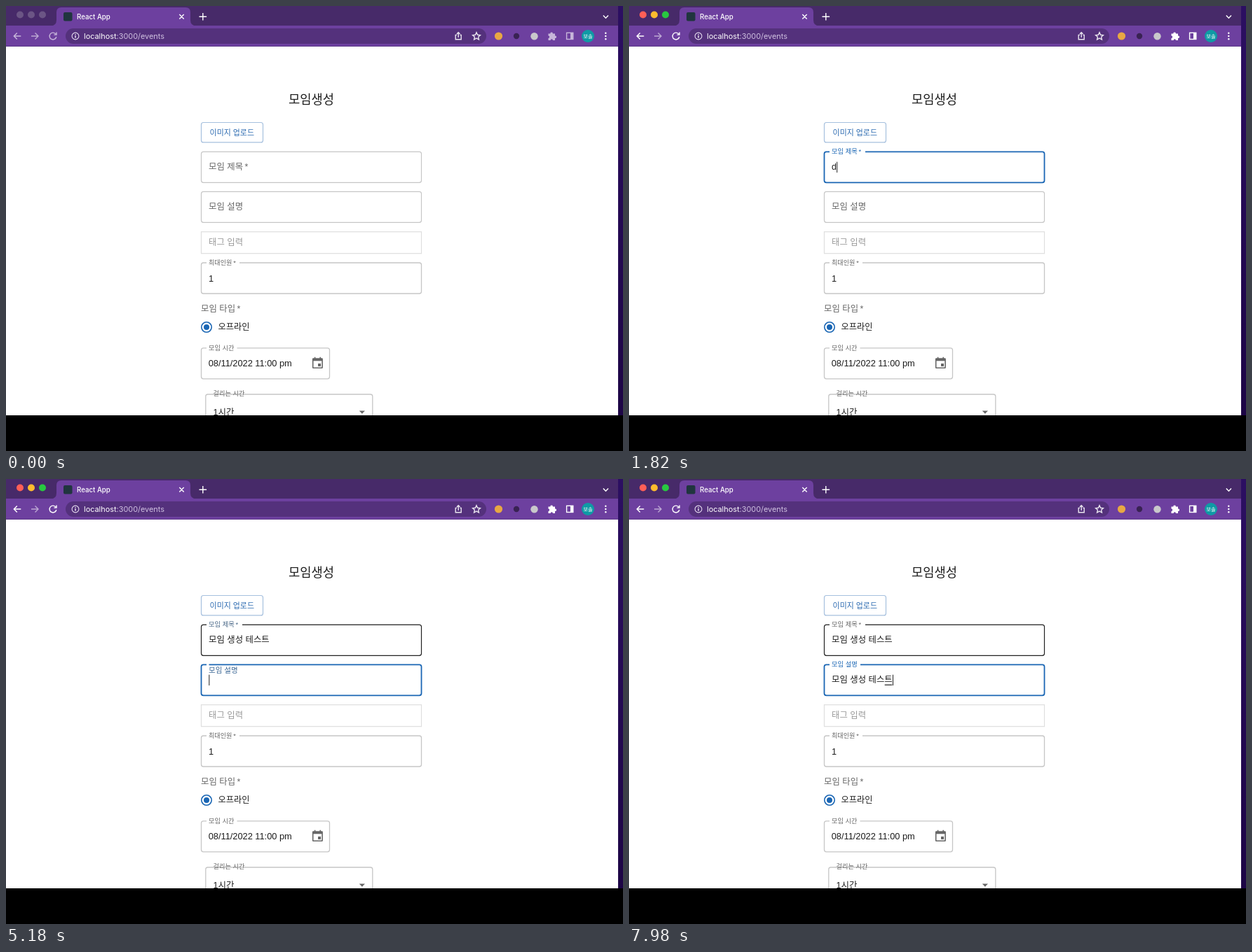
These frames come from a looping animation (880 px wide and 636 px high, 8000 ms). An HTML page:

```html
<!DOCTYPE html>
<html lang="ko">
<head>
<meta charset="utf-8">
<title>React App</title>
<style>
html, body { margin: 0; width: 100%; height: 100%; overflow: hidden; background: #000; }
svg { display: block; width: 100vw; height: 100vh; }
text { white-space: pre; font-family: 'Liberation Sans', 'Noto Sans CJK KR', 'Noto Sans CJK', sans-serif; }
.ui { font-family: Inter, 'Noto Sans CJK KR', 'Noto Sans CJK', sans-serif; }
</style>
</head>
<body>
<svg id="stage" viewBox="0 0 880 636" xmlns="http://www.w3.org/2000/svg"></svg>
<script>
const LOOP = 8000, TICK = 70;
const BLUE = '#1a66b4', GREY = '#c6c6c6', DARK = '#222', MUTED = '#666';
const ACTIVATE = 980, FOCUS_TITLE = 1072, TYPO = 1790, ERASE = 2870, FOCUS_DESC = 5128;

const text = (x, y, size, fill, str, extra = '') =>
  `<text x="${x}" y="${y}" font-size="${size}" fill="${fill}" ${extra}>${str}</text>`;
const box = (x, y, w, h, extra) => `<rect x="${x}" y="${y}" width="${w}" height="${h}" ${extra}/>`;
const dot = (x, y, r, extra) => `<circle cx="${x}" cy="${y}" r="${r}" ${extra}/>`;
const line = (d, extra = '') =>
  `<path d="${d}" fill="none" stroke="#fff" stroke-width="1.4" ${extra}/>`;
const outline = (x, y, w, h, id = '') =>
  box(x, y, w, h, `rx="3" fill="none" stroke="${GREY}" stroke-width="1.3" ${id}`);
const notch = (x, y, w, id = '') => box(x, y - 2, w, 4, `fill="#fff" ${id}`);

const chrome = `
  ${box(0, 0, 873, 58, 'fill="#472a69"')}
  <path d="M64 28.5Q72 28 72 20V9Q72 2 79 2H256Q263 2 263 9V20Q263 28 271 28.5Z" fill="#6d409f"/>
  ${box(0, 28, 873, 29.6, 'fill="#6d409f"')}
  ${['#ff5f57', '#febc2e', '#28c840'].map((c, i) =>
    dot(20 + 16 * i, 12.5, 5, `class="light" data-on="${c}"`)).join('')}
  ${box(82, 9, 12.5, 12.5, 'rx="2" fill="#20353f"')}
  ${text(101, 18.6, 9.7, '#fff', 'React App', 'class="ui" font-weight="500"')}
  ${line('M247.3 12l6.4 6.4M253.7 12l-6.4 6.4M275.5 15.2h10.6M280.8 9.9v10.6M851.8 13.6l3.6 3.6 3.6-3.6')}
  ${box(85, 32, 600, 22, 'rx="11" fill="#54317c"')}
  <g class="dim">
    ${line('M21.3 43H11.5M15.8 38.5L11.3 43l4.5 4.5')}
    ${line('M71 40.2a4.9 4.9 0 1 0 .8 3.8M72 37.6v3.5h-3.6')}
  </g>
  ${line('M36 43h9.8M41.5 38.5L46 43l-4.5 4.5', 'opacity=".55"')}
  ${dot(99, 43, 4.9, 'fill="none" stroke="#e6dcf0" stroke-width="1.1"')}
  ${line('M99 42.4v3.2M99 40.2v1.2', 'stroke-width="1.1"')}
  <text x="111" y="46.8" font-size="10.9" fill="#fff" class="ui">localhost<tspan fill="#cfc0e0">:3000/events</tspan></text>
  <g opacity=".88">
    ${line('M643 41.4h-1.8v6.4h8v-6.4h-1.8M645.2 45v-7M642.9 40l2.3-2.3 2.3 2.3', 'stroke-width="1.1"')}
    ${line('M671 37.8l1.6 3.5 3.8.4-2.8 2.6.8 3.7-3.4-1.9-3.4 1.9.8-3.7-2.8-2.6 3.8-.4Z', 'stroke-width="1.1"')}
  </g>
  ${dot(702.5, 43, 5.6, 'fill="#e8a843"')}
  ${dot(728, 43, 4.2, 'fill="#392253"')}
  ${dot(753.5, 43.2, 5.2, 'fill="#c9c8cb"')}
  <g class="dim">
    <path d="M773.5 39.5h3a1.7 1.7 0 1 1 3.3 0h3.2v3.2a1.7 1.7 0 1 1 0 3.3v3h-3a1.7 1.7 0 0 0-3.4 0h-3.1v-3.1a1.7 1.7 0 0 0 0-3.4Z" fill="#fff"/>
    ${box(799.6, 38.3, 9.2, 9.2, 'fill="none" stroke="#fff" stroke-width="1.4"')}
    ${box(805, 38.3, 4, 9.2, 'fill="#fff"')}
  </g>
  ${dot(830, 43, 9, 'fill="#0f9aa5"')}
  ${text(830, 45.7, 7.2, '#fff', '보솔', 'text-anchor="middle" class="ui"')}
  ${[38.8, 43, 47.2].map(y => dot(855.3, y, 1.2, 'fill="#fff"')).join('')}`;

// A text field whose label, outline and value change over time.
const liveField = (id, y, label) => `
  ${outline(278.5, y, 314, 44, `id="${id}Box"`)}
  ${notch(286, y, 0, `id="${id}Notch"`)}
  ${text(0, 0, 12.4, MUTED, label, `id="${id}Label"`)}
  ${text(289, y + 26, 12.4, '#1c1c1c', '', `id="${id}Text"`)}
  ${box(0, y + 28.4, 10.6, 1.2, `fill="#222" id="${id}Under"`)}
  ${box(0, y + 14.4, 1, 15.4, `fill="#222" id="${id}Caret"`)}`;

const form = `
  ${text(435.5, 139.8, 17.7, '#1c1c1c', '모임생성', 'text-anchor="middle"')}
  ${box(278.5, 166.5, 88, 28.4, 'rx="3" fill="none" stroke="#a6c0de" stroke-width="1.2"')}
  ${text(322.3, 184.6, 10.95, '#2a69b0', '이미지 업로드', 'text-anchor="middle" font-weight="500"')}
  ${liveField('title', 208.3, '모임 제목\u2009*')}
  ${liveField('desc', 265.3, '모임 설명')}
  ${box(278.5, 322.7, 314, 31, 'fill="none" stroke="#dedede" stroke-width="1.2"')}
  ${text(289, 341.9, 12.4, '#9a9a9a', '태그 입력')}
  ${outline(278.5, 367, 314, 44)}${notch(286, 367, 47)}
  ${text(289, 370, 9.1, MUTED, '최대인원\u2009*')}
  ${text(289, 393.8, 12.8, '#1c1c1c', '1')}
  ${text(278, 437.4, 12.4, MUTED, '모임 타입\u2009*')}
  ${dot(286, 459, 7.2, `fill="none" stroke="${BLUE}" stroke-width="1.6"`)}
  ${dot(286, 459, 4, `fill="${BLUE}"`)}
  ${text(302.6, 463.4, 12.2, '#1c1c1c', '오프라인')}
  ${outline(278.5, 488.8, 183, 44)}${notch(286, 488.8, 43.5)}
  ${text(289, 491.8, 9.2, MUTED, '모임 시간')}
  ${text(288.7, 515.2, 12.8, '#1c1c1c', '08/11/2022 11:00 pm')}
  <path fill="#666" fill-rule="evenodd" d="M439.8 501.8h1.6v1.5h6v-1.5h1.6v1.5h1.5q1.4 0 1.4 1.4v12q0 1.4-1.4 1.4h-12.2q-1.4 0-1.4-1.4v-12q0-1.4 1.4-1.4h1.5ZM438.5 507.2v9.3h11.8v-9.3ZM445 511h4v4h-4Z"/>
  ${outline(284.8, 555, 238, 44)}
  ${text(295.6, 557.2, 9.2, MUTED, '걸리는 시간')}
  ${text(295.6, 584.6, 12.5, '#1c1c1c', '1시간')}
  <path d="M503.8 578.6h8.2l-4.1 4.1Z" fill="#666"/>`;

const hints = ['테스트', '테스트22', '두메길 맵 적용 되나??', '모임생성', '수정 테스트', 'testtest'];
const menu = `<g id="menu">
  ${box(357, 260, 124.4, 178, 'rx="3" fill="#2b2b2b" stroke="#1d1d1d" stroke-opacity=".35"')}
  <path d="M367.5 260.5l7-7 7 7Z" fill="#2b2b2b"/>
  ${hints.map((h, i) => text(366.6, 281.1 + 28.7 * i, 9.9, '#f2f2f2', h, 'class="ui"')).join('')}
</g>`;

const cursors = `
  <path id="arrow" d="M0 0V13.5L3.1 10.6 5.1 15.4 7.3 14.5 5.3 9.8H9.6Z" fill="#000" stroke="#fff"/>
  <g id="beam" fill="none">
    <path d="M-3-6Q0-6 0-4Q0-6 3-6M0-5V5M-3 6Q0 6 0 4Q0 6 3 6" stroke="#fff" stroke-width="2.6"/>
    <path d="M-3-6Q0-6 0-4Q0-6 3-6M0-5V5M-3 6Q0 6 0 4Q0 6 3 6" stroke="#111" stroke-width="1.1"/>
  </g>`;

const stage = document.getElementById('stage');
stage.innerHTML = `
  <defs>
    <linearGradient id="desk" x2="0" y2="1"><stop stop-color="#2c0f62"/><stop offset="1" stop-color="#1d0546"/></linearGradient>
    <clipPath id="view">${box(0, 0, 880, 585, '')}</clipPath>
  </defs>
  ${box(0, 0, 880, 636, '')}
  ${box(873, 0, 7, 585, 'fill="url(#desk)"')}
  <g clip-path="url(#view)">${box(0, 57, 873, 528, 'fill="#fff"')}${form}${chrome}${menu}${cursors}</g>`;

const $ = id => document.getElementById(id);
const set = (el, attrs) => { for (const k in attrs) el.setAttribute(k, attrs[k]); };
const show = (el, on) => set(el, { visibility: on ? 'visible' : 'hidden' });
const clamp = v => Math.min(1, Math.max(0, v));
const mix = (a, b, k) => a + (b - a) * k;

// cubic-bezier(0, 0, .2, 1)
function easeOut(x) {
  x = clamp(x);
  let lo = 0, hi = 1;
  for (let i = 0; i < 20; i++) {
    const p = (lo + hi) / 2;
    if (.6 * (1 - p) * p * p + p ** 3 < x) lo = p; else hi = p;
  }
  return 3 * (1 - lo) * lo * lo + lo ** 3;
}

// What the field holds after each Hangul keystroke.
const steps = ['ㅁ', '모', '몽', '모이', '모임', '모임 ', '모임 ㅅ', '모임 새', '모임 생',
  '모임 생ㅅ', '모임 생서', '모임 생성', '모임 생성 ',
  ...['ㅌ', '테', '텟', '테스', '테슽', '테스트'].map(s => '모임 생성 ' + s)];
const titleKeys = steps.map((s, i) => ({ s, at: i < 13 ? 2980 + 101 * i : 4340 + 98 * (i - 13) }));
titleKeys.unshift({ s: 'd', at: TYPO }, { s: '', at: ERASE });
const descKeys = steps.map((s, i) =>
  ({ s, at: i < 8 ? 5950 + 130 * i : i < 11 ? 7000 + 70 * (i - 8) : 7210 + 110 * (i - 11) }));

const fields = [
  { id: 'title', y: 208.3, gap: 51, from: FOCUS_TITLE, to: FOCUS_DESC, keys: titleKeys, hover: ACTIVATE },
  { id: 'desc', y: 265.3, gap: 44, from: FOCUS_DESC, to: Infinity, keys: descKeys, hover: Infinity }
];

function drawField(f, t) {
  const focused = t >= f.from && t < f.to;
  const rise = easeOut((t - f.from) / 200);
  const tint = rise * (1 - easeOut((t - f.to) / 200));
  set($(f.id + 'Box'), {
    stroke: focused ? BLUE : t >= f.hover ? DARK : GREY,
    'stroke-width': focused ? 1.8 : 1.2
  });
  set($(f.id + 'Notch'), { width: f.gap * easeOut((t - f.from - 50) / 100) });
  set($(f.id + 'Label'), {
    transform: `translate(289 ${f.y + mix(25.8, 2.8, rise)}) scale(${mix(1, .75, rise)})`,
    fill: `rgb(${mix(102, 26, tint)},102,${mix(102, 180, tint)})`
  });

  let str = '', last = f.from;
  for (const k of f.keys) if (k.at <= t) { str = k.s; last = k.at; }
  const el = $(f.id + 'Text');
  if (el.textContent !== str) el.textContent = str;
  const end = 289 + (str ? el.getComputedTextLength() : 0);
  set($(f.id + 'Caret'), { x: end + .3 });
  show($(f.id + 'Caret'), focused && Math.floor((t - last) / 500) % 2 === 0);
  set($(f.id + 'Under'), { x: end - 11 });
  show($(f.id + 'Under'), focused && /[ㄱ-힣]$/.test(str));
}

function drawCursor(t) {
  const k = clamp((t - 70) / 840), e = k * k * (3 - 2 * k);
  const x = mix(874, 472, e), y = mix(2, 229, e ** 1.2);
  for (const id of ['arrow', 'beam']) set($(id), { transform: `translate(${x} ${y})` });
  show($('arrow'), t >= 70 && t < ACTIVATE);
  show($('beam'), t >= ACTIVATE && t < TYPO);
}

function draw(t) {
  const active = t >= ACTIVATE;
  document.querySelectorAll('.light').forEach(el =>
    set(el, { fill: active ? el.dataset.on : '#6b5585' }));
  document.querySelectorAll('.dim').forEach(el => set(el, { opacity: active ? 1 : .62 }));
  fields.forEach(f => drawField(f, t));
  show($('menu'), t >= 1150 && t < TYPO);
  drawCursor(t);
}

const start = performance.now();
function loop() {
  const t = (performance.now() - start) % LOOP;
  draw(Math.floor(t / TICK) * TICK);
  requestAnimationFrame(loop);
}
loop();
</script>
</body>
</html>
```
